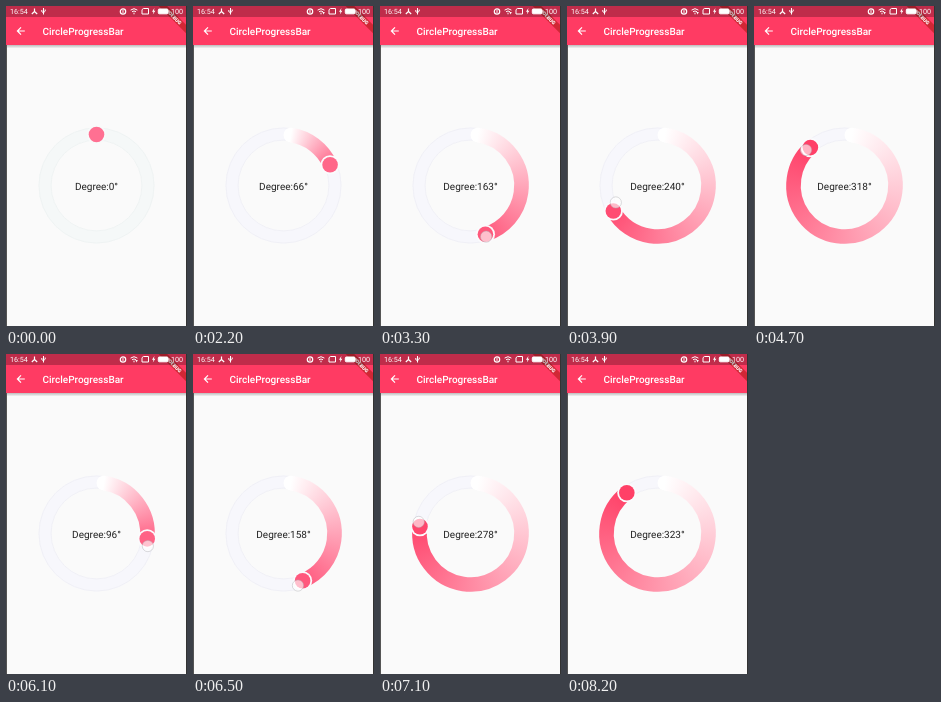
An HTML page with a canvas for the animation above (8.6 s loop, 181 by 320 pixels).

```html
<!DOCTYPE html>
<html lang="en">
<head>
<meta charset="utf-8">
<title>CircleProgressBar</title>
<style>
  html, body { margin: 0; width: 100%; height: 100%; overflow: hidden; background: #fafafa; }
  canvas, svg { position: absolute; left: 0; top: 0; width: 181px; height: 320px; }
  text { font-family: Roboto, sans-serif; fill: #fff; text-rendering: geometricPrecision; }
</style>
</head>
<body>
<canvas id="dial"></canvas>
<svg viewBox="0 0 181 320">
  <defs>
    <linearGradient id="shade" x2="0" y2="1">
      <stop stop-opacity=".25"/><stop offset="1" stop-opacity="0"/>
    </linearGradient>
  </defs>
  <!-- app bar -->
  <rect y="39" width="181" height="3.5" fill="url(#shade)"/>
  <rect width="181" height="39" fill="#ff3b63"/>
  <path d="M18.8 25H11.8M15 21.4L11.4 25L15 28.6" fill="none" stroke="#fff" stroke-width="1.2"/>
  <text x="36.5" y="28.8" font-size="10" font-weight="500">CircleProgressBar</text>
  <g transform="translate(181 0) rotate(45)">
    <rect x="-20" y="14" width="40" height="6" fill="#b71c1c" fill-opacity=".63"/>
    <text y="18.8" font-size="5.1" font-weight="900" text-anchor="middle">DEBUG</text>
  </g>
  <!-- status bar -->
  <rect width="181" height="11" fill-opacity=".25"/>
  <g transform="translate(0 -.5)">
    <text x="4" y="8.5" font-size="7.2">16:54</text>
    <text x="165" y="8.5" font-size="7.2">100</text>
    <g fill="none" stroke="#fff">
      <path d="M28.5 3V6L25.8 8.5M28.5 6L31.2 8.5" stroke-width="1.2"/>
      <path d="M37.5 2.5V9M35.8 4.5V6.2L37.5 7.2L39.2 5.7V4"/>
      <circle cx="117" cy="6" r="2.7" stroke-width="1.2"/>
      <path d="M117 4.6V7.4"/>
      <path d="M124.6 4.6Q128 1.8 131.4 4.6M126 6.3Q128 4.6 130 6.3M128 7.2V8.8"/>
      <path d="M136 4.2L137.4 3H142.5V8.5H136Z"/>
      <rect x="152.3" y="3.5" width="9.7" height="4.8" rx="1" fill="#fff"/>
      <path d="M163 4.8V7"/>
    </g>
    <path d="M148.4 2.5L146 6.2H147.5L146.8 9L149.4 5.2H147.9Z" fill="#fff"/>
    <path id="signal" d="M129.4 6.6H131.8L130.6 8.9Z" fill="#fff"/>
  </g>
  <!-- screen edges -->
  <rect y="39" width="1" height="281" fill="#555"/>
  <rect x="180" width="1" height="320" fill="#333"/>
  <text id="label" x="90.5" y="183.5" font-size="10" text-anchor="middle" style="fill:#212121"></text>
</svg>
<script>
const LOOP = 8600, CX = 90.5, CY = 179.5, R = 51, WIDTH = 14.6;
const CAP = Math.asin(WIDTH / 2 / R);

// [ms, degrees]: two taps, then one long drag
const DEGREES = [
  [1000, 0], [1400, 66], [2300, 66], [2700, 163], [3400, 163], [3900, 240],
  [4300, 303], [4500, 322], [4700, 318], [5000, 286], [5200, 262], [5500, 91],
  [5600, 79], [5700, 74], [5900, 78], [6100, 96], [6500, 158], [6700, 184],
  [7000, 268], [7400, 307], [7700, 323]
];
// [ms, distance of the finger from the centre]
const REACH = [[3300, 53.5], [3900, 45], [4700, 52.4], [5500, 51.2], [6500, 54], [7800, 52]];

const canvas = document.getElementById('dial');
const label = document.getElementById('label');
const signal = document.getElementById('signal');
const ctx = canvas.getContext('2d');
const scale = window.devicePixelRatio || 1;
canvas.width = 181 * scale;
canvas.height = 320 * scale;
ctx.scale(scale, scale);

function at(keys, t) {
  const i = keys.findIndex(k => k[0] > t);
  if (i === 0) return keys[0][1];
  if (i < 0) return keys[keys.length - 1][1];
  const [t0, a] = keys[i - 1], [t1, b] = keys[i];
  return a + (b - a) * (t - t0) / (t1 - t0);
}

const radians = deg => (deg - 90) * Math.PI / 180;
const polar = (deg, r) => [CX + r * Math.cos(radians(deg)), CY + r * Math.sin(radians(deg))];

function ring(r, width, style, from = 0, to = 2 * Math.PI) {
  ctx.beginPath();
  ctx.arc(CX, CY, r, from, to);
  ctx.lineWidth = width;
  ctx.strokeStyle = style;
  ctx.stroke();
}

function disc([x, y], r, fill) {
  ctx.beginPath();
  ctx.arc(x, y, r, 0, 2 * Math.PI);
  ctx.fillStyle = fill;
  ctx.fill();
}

function draw(t) {
  const deg = at(DEGREES, t), p = deg / 360;
  const pink = `rgb(255 ${112 - 54 * p} ${146 - 48 * p})`;
  ctx.clearRect(0, 0, 181, 320);

  ring(51.5, 12.6, deg ? '#f7f7fc' : '#f5f8f8');
  for (const r of [45.4, 57.6]) ring(r, 1, deg ? '#f0f0f6' : '#eff3f3');

  const start = radians(0) + CAP, end = radians(deg);
  if (end > start) {
    // the sweep begins behind the round cap so the cap stays white
    const sweep = ctx.createConicGradient(radians(0), CX, CY);
    sweep.addColorStop(0, '#fff');
    sweep.addColorStop(CAP / (2 * Math.PI), '#fff');
    sweep.addColorStop(p, pink);
    disc(polar(CAP * 180 / Math.PI, R), WIDTH / 2, '#fff');
    ring(R, WIDTH, sweep, start, end);
  }

  const knob = polar(deg, R);
  disc(knob, 9.6, deg ? '#fbfbfd' : '#f8fafa');
  disc(knob, 7.8, pink);

  if (t >= 3300 && t < 7800) {
    disc(polar(at(DEGREES, t + 50), at(REACH, t)), 5.6, 'rgb(255 255 255 / .62)');
    ctx.lineWidth = 1;
    ctx.strokeStyle = 'rgb(175 175 180 / .45)';
    ctx.stroke();
  }

  label.textContent = `Degree:${Math.round(deg)}°`;
  signal.style.opacity = (t >= 2200 && t < 6300) || t >= 8200 ? 1 : 0;
}

function tick() {
  draw(Math.floor(performance.now() % LOOP / 100) * 100);
  requestAnimationFrame(tick);
}
tick();
</script>
</body>
</html>
```
